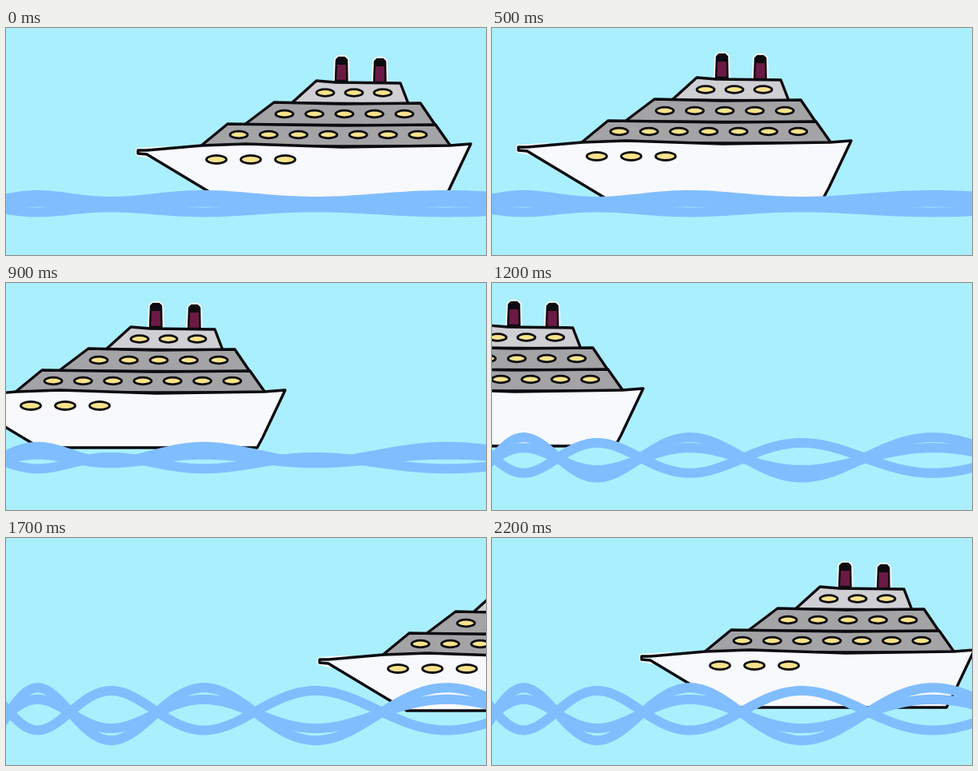
Recreate the animation shown at these times as an HTML page with a canvas. Size 600 px wide and 284 px high, loop 2.4 s.

```html
<!DOCTYPE html>
<html lang="en">
<head>
<meta charset="utf-8">
<title>Cruise ship</title>
<style>
html, body { margin: 0; width: 100%; height: 100%; overflow: hidden; background: #aaeffe; }
canvas { display: block; }
</style>
</head>
<body>
<canvas id="stage" width="600" height="284"></canvas>
<script>
const ctx = document.getElementById('stage').getContext('2d');
const SKY = '#aaeffe', SEA = '#80bdff', INK = '#0c0c10', GREY = '#a4a4a7';
const LOOP = 2400, TICK = 100, TICKS_PER_POSE = 1.705;

// Ship course: pose, x, y. It leaves on the left and comes back from the right.
const course = [
  [0, 0, 0], [2, -88, -3], [4, -176, -5], [5, -232, -11], [7, -392, -13],
  [8, -472, -13], [9, 295, -2], [10, 227, -1], [13, 22, -5]
];

// Poses are evenly spaced and start on whole ticks.
function poseAt(time) {
  const tick = Math.floor(time / TICK);
  return Math.ceil((tick + 0.5) / TICKS_PER_POSE) - 1;
}

function shipAt(pose) {
  const to = course.find(key => key[0] >= pose);
  const from = course[Math.max(0, course.indexOf(to) - 1)];
  const mix = (pose - from[0]) / (to[0] - from[0] || 1);
  return [1, 2].map(i => from[i] + (to[i] - from[i]) * mix);
}

function smoothstep(from, to, value) {
  const u = Math.min(1, Math.max(0, (value - from) / (to - from)));
  return u * u * (3 - 2 * u);
}

function shape(points, fill, width = 3.4, stroke = INK) {
  ctx.beginPath();
  points.forEach(([x, y]) => ctx.lineTo(x, y));
  ctx.closePath();
  ctx.fillStyle = fill;
  ctx.fill();
  ctx.lineWidth = width;
  ctx.strokeStyle = stroke;
  ctx.stroke();
}

function funnel(x, y) {
  const top = [[x + 1, y + 4], [x + 4, y + 1], [x + 11, y + 1], [x + 14, y + 4]];
  const body = [[x, y + 30], ...top, [x + 14.5, y + 30]];
  shape(body, '#fff', 6, '#fff');
  shape(body, '#6b1a44', 2.5);
  shape([[x + 1, y + 9], ...top, [x + 14, y + 9]], INK, 2);
}

function windows(count, x, y, step, rx = 11, ry = 4.3) {
  ctx.fillStyle = '#f8e38c';
  ctx.strokeStyle = INK;
  ctx.lineWidth = 2.8;
  for (let i = 0; i < count; i++) {
    ctx.beginPath();
    ctx.ellipse(x + i * step, y, rx, ry, 0, 0, Math.PI * 2);
    ctx.fill();
    ctx.stroke();
  }
}

function drawShip(x, y) {
  ctx.save();
  ctx.translate(x, y);
  funnel(412, 36);
  funnel(460, 38);
  shape([[357, 94], [388, 66], [412, 68], [493, 69], [503, 95]], '#d0d0d4');
  shape([[298, 121], [335, 93], [420, 95], [518, 94], [537, 122]], GREY);
  shape([[243, 148], [277, 120], [420, 122], [537, 121], [556, 148]], GREY);
  shape([[165, 153], [200, 151], [180, 160], [165, 157]], '#fff', 6, '#fff');
  shape([[165, 153], [176, 153], [245, 147], [300, 145], [420, 149], [555, 147],
         [581, 145], [553, 204], [546, 217], [274, 217], [176, 158], [165, 157]], '#f8f9fd');
  windows(3, 399, 81, 36);
  windows(5, 348, 107.5, 37.5);
  windows(7, 291, 133.5, 37.3);
  windows(3, 263, 164.5, 43, 12.5, 5);
  ctx.restore();
}

// A standing wave whose crests lie further apart towards the right.
function drawStrand(level, height) {
  ctx.beginPath();
  for (let x = -10; x <= 610; x += 5) {
    const halfWaves = Math.sqrt(7.8 + x / 12) - 3.33;
    ctx.lineTo(x, level - height * Math.cos(Math.PI * halfWaves));
  }
  ctx.lineWidth = 12;
  ctx.strokeStyle = SEA;
  ctx.stroke();
}

// The sea starts almost flat and grows rough during the loop.
function drawSea(pose) {
  const swell = 4 + 29 * smoothstep(3.5, 8.8, pose);
  drawStrand(212 + swell * 0.25, swell);
  drawStrand(220, swell * 0.55);
  drawStrand(229 - swell * 0.4, swell * -0.75);
}

function draw() {
  const pose = poseAt(performance.now() % LOOP);
  ctx.lineJoin = ctx.lineCap = 'round';
  ctx.fillStyle = SKY;
  ctx.fillRect(0, 0, 600, 284);
  drawShip(...shipAt(pose));
  drawSea(pose);
  requestAnimationFrame(draw);
}
draw();
</script>
</body>
</html>
```
